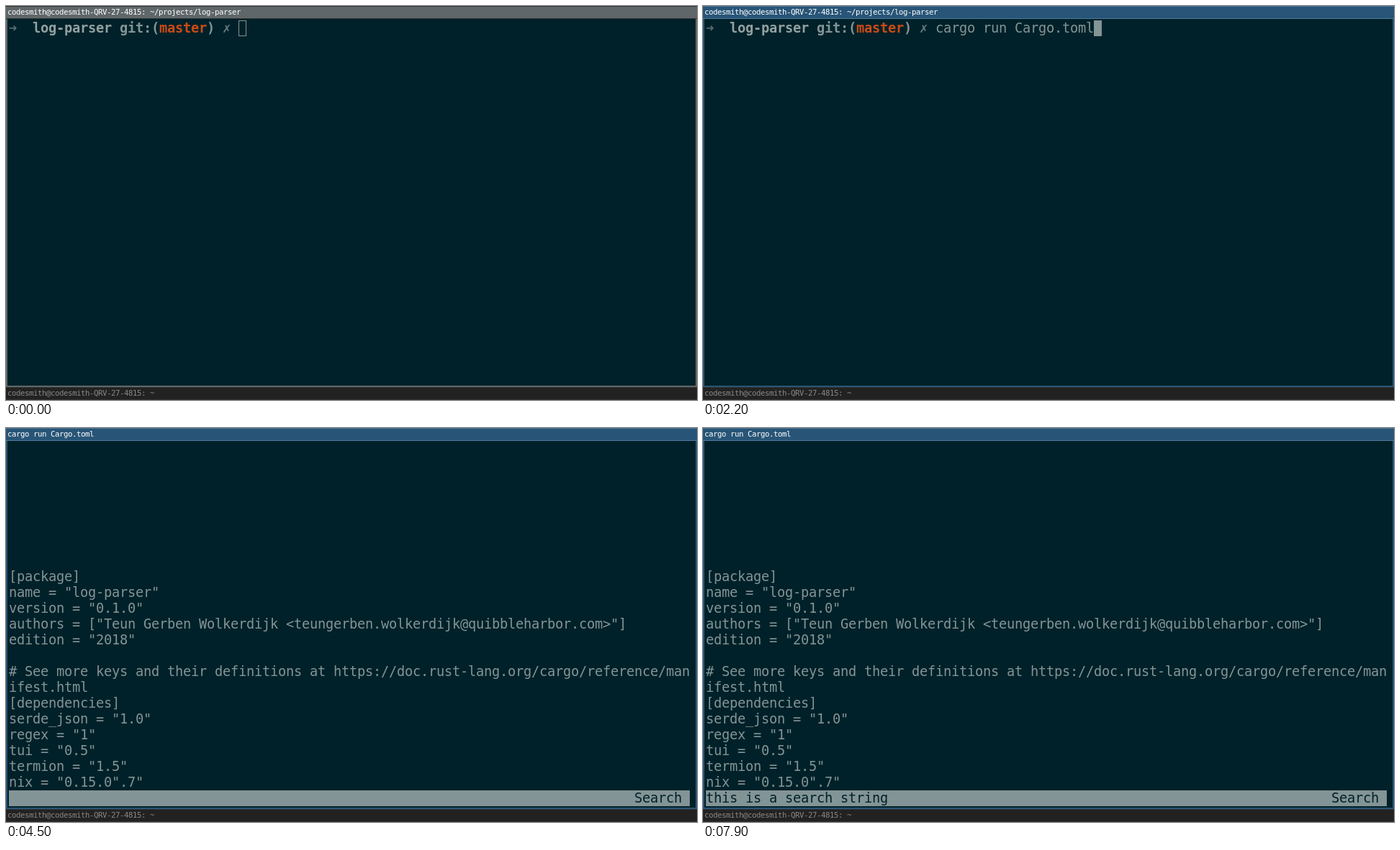
These frames come from a looping animation (960 px wide and 548 px high, 8 s). An HTML page with a canvas:

```html
<!DOCTYPE html>
<html lang="en">
<head>
<meta charset="utf-8">
<title>Terminal pager</title>
<style>
  html, body { margin: 0; width: 100%; height: 100%; overflow: hidden; background: #002129; }
  canvas { display: block; }
</style>
</head>
<body>
<canvas id="stage" width="960" height="548"></canvas>
<script>
const ctx = document.getElementById('stage').getContext('2d');

const LOOP = 8000;
const CELL = { w: 11, h: 22, left: 4, top: 20 };
const MONO = '"DejaVu Sans Mono", monospace';
const BACK = '#002129', TEXT = '#839496';
const FOCUSED = { fill: '#285577', line: '#4c7899' };
const INACTIVE = { fill: '#5f676a', line: '#333333' };
const UNFOCUSED = { fill: '#222222', line: '#333333' };

const HOST = 'codesmith@codesmith-QRV-27-4815: ~';
const COMMAND = 'cargo run Cargo.toml';
const QUERY = 'this is a search string';
// Moment of each keystroke of the query, in tenths of a second
const KEYS = [46, 47, 48, 49, 50, 53, 54, 55, 56, 57, 66, 68,
              69, 70, 71, 72, 73, 75, 76, 77, 78, 78, 79];

const FIRST_ROW = 8, STATUS_ROW = 22;
const MANIFEST = `[package]
name = "log-parser"
version = "0.1.0"
authors = ["Teun Gerben Wolkerdijk <teungerben.wolkerdijk@quibbleharbor.com>"]
edition = "2018"

# See more keys and their definitions at https://doc.rust-lang.org/cargo/reference/man
ifest.html
[dependencies]
serde_json = "1.0"
regex = "1"
tui = "0.5"
termion = "1.5"
nix = "0.15.0".7"`.split('\n');

function rect(x, y, w, h, color) {
  ctx.fillStyle = color;
  ctx.fillRect(x, y, w, h);
}

// Draws one character per fixed-width cell
function cells(text, x, y, step, color) {
  ctx.fillStyle = color;
  [...text].forEach((char, i) => ctx.fillText(char, x + i * step, y));
}

const colX = col => CELL.left + col * CELL.w;
const rowY = row => CELL.top + row * CELL.h;

function print(text, col, row, color = TEXT, weight = 'normal') {
  ctx.font = `${weight} 18.67px ${MONO}`;
  cells(text, colX(col), rowY(row) + 17, CELL.w, color);
}

function bar(y, text, theme, color) {
  rect(0, y, 960, 18, theme.fill);
  rect(0, y, 960, 1, theme.line);
  rect(0, y + 17, 960, 1, theme.line);
  ctx.font = `10.67px ${MONO}`;
  cells(text, 2, y + 12, 6, color);
}

function cursor(col, row, filled = true) {
  if (filled) {
    rect(colX(col), rowY(row), CELL.w, CELL.h, TEXT);
  } else {
    ctx.strokeStyle = TEXT;
    ctx.lineWidth = 1;
    ctx.strokeRect(colX(col) + .5, rowY(row) + .5, CELL.w - 1, CELL.h - 1);
  }
}

function prompt(command) {
  print('➜', 0, 0, '#586e75', 'bold');
  print('log-parser', 3, 0, '#93a1a1', 'bold');
  print('git:(', 14, 0, TEXT, 'bold');
  print('master', 19, 0, '#cb4b16', 'bold');
  print(')', 25, 0, TEXT, 'bold');
  print('✗', 27, 0, '#657b83', 'bold');
  print(command, 29, 0);
}

function shell(t) {
  const command = t < 1700 ? '' : t < 2200 ? 'reset' : COMMAND;
  prompt(command);
  if (t < 2500) cursor(29 + command.length, 0, t >= 100);
  else cursor(0, 1);
}

function pager(t) {
  MANIFEST.forEach((line, i) => print(line, 0, FIRST_ROW + i));
  rect(colX(0), rowY(STATUS_ROW), 86 * CELL.w, CELL.h, TEXT);
  const typed = KEYS.filter(key => key * 100 <= t).length;
  print(QUERY.slice(0, typed), 0, STATUS_ROW, BACK);
  print(t < 4500 ? 'Normal' : 'Search', 79, STATUS_ROW, BACK);
}

function draw(t) {
  const theme = t < 100 ? INACTIVE : FOCUSED;
  rect(0, 0, 960, 530, theme.fill);
  rect(2, 18, 956, 510, BACK);
  bar(0, t < 2500 ? HOST + '/projects/log-parser' : COMMAND, theme, '#ffffff');
  bar(530, HOST, UNFOCUSED, '#888888');

  if (t < 2600) {
    shell(t);
  } else if (t < 2700) {
    print('[package]og-parser"', 0, STATUS_ROW - 1);
    cursor(9, STATUS_ROW);
  } else {
    pager(t);
  }
}

function tick() {
  draw(performance.now() % LOOP);
  requestAnimationFrame(tick);
}
tick();
</script>
</body>
</html>
```
